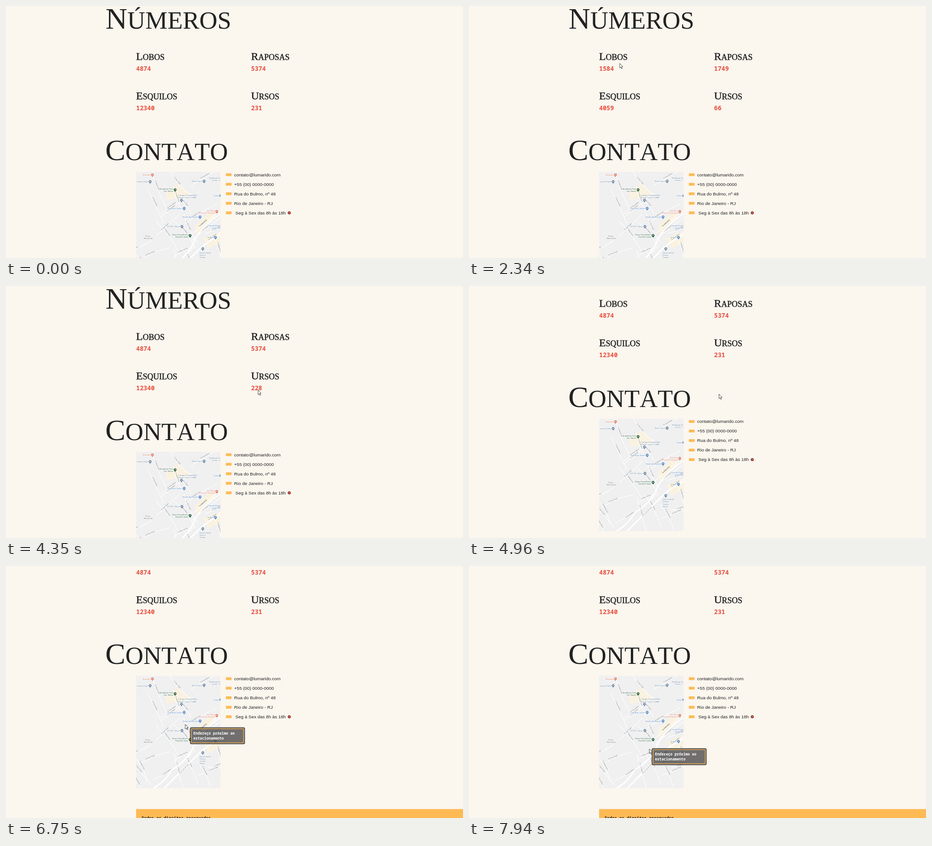
An HTML page for the animation above (8000 ms loop, 1008x556 px).

```html
<!DOCTYPE html>
<html lang="pt-br">
<head>
<meta charset="utf-8">
<title>Números e contato</title>
<style>
  html, body { margin: 0; width: 100%; height: 100%; overflow: hidden; background: #fbf6ee; }
  #stage { display: block; width: 1008px; height: 556px; }
  text { fill: #222; white-space: pre; }
  .title { font: 66.5px "Liberation Serif", serif; font-kerning: none; }
  .title tspan { font-size: 55px; }
  .animal { font: 24px "Liberation Serif", serif; stroke: #222; stroke-width: .5; }
  .animal tspan { font-size: 18px; }
  .count { font: bold 13.65px "Noto Sans Mono", monospace; fill: #e8503f; }
  .contact { font: 9.95px "Liberation Sans", sans-serif; }
  .rights { font: bold 9.1px "Noto Sans Mono", monospace; }
  .hint { font: bold 8px "Noto Sans Mono", monospace; fill: #fff; }
  .place { font: 4.4px Roboto, sans-serif; fill: currentColor; stroke: #fff; stroke-width: .5; paint-order: stroke; }
  .street { font: 3.6px Roboto, sans-serif; fill: #7d8084; }
  .road { fill: none; stroke: #fff; }
</style>
</head>
<body>
<svg id="stage" viewBox="0 0 1008 556">
  <g id="page">
    <g id="content">
      <text class="title" x="219.5" y="50">N<tspan>ÚMEROS</tspan></text>
      <text class="title" x="219" y="340">C<tspan>ONTATO</tspan></text>
      <g id="animals"></g>
      <svg id="map" x="287" y="366" width="186" height="248">
        <rect width="186" height="248" fill="#f0f0f1"/>
        <path fill="#faf2e0" d="M66 46L92 26L122 52L68 62ZM130 118L162 88L176 96L132 140ZM148 146L186 132V156L160 170Z"/>
        <g id="streets"></g>
        <path class="road" stroke-width="3" d="M186 92Q140 124 127 155T78 208Q62 236 38 248M186 138Q150 158 134 176L62 248"/>
        <text class="street" transform="translate(96 216) rotate(-45)">Rua Lume do Vale</text>
        <text class="street" transform="translate(141 121) rotate(-47)">Av. Marulana</text>
        <text class="place" color="#74797f" x="20" y="142.500">Praça<tspan x="17" dy="5.200">Murelinda</tspan></text>
        <g id="places"></g>
      </svg>
      <g id="contacts"></g>
    </g>
    <rect x="287" y="660" width="721" height="80" fill="#ffba54"/>
    <text class="rights" x="299" y="682.500">Todos os direitos reservados</text>
  </g>
  <g id="tooltip">
    <rect width="121.500" height="37.500" rx="3.500" fill="#292727" fill-opacity=".73"/>
    <rect x="3.250" y="3.250" width="115" height="31" rx="1" fill="#fff" fill-opacity=".1" stroke="#e8ae58" stroke-width="1.500"/>
    <text class="hint" x="7.500" y="16.500">Endereço próximo ao</text>
    <text class="hint" x="7.500" y="27">estacionamento</text>
  </g>
  <path id="cursor" d="M.5 .5V10.500L2.800 8.400L4.400 12.200L5.900 11.500L4.300 7.800H7.300Z" fill="#fff" stroke="#222" stroke-width=".8"/>
</svg>
<script>
const LOOP = 8000, RELOAD = 1330, REVEAL = 1500, TICK = 24.8, SCROLL = 123.7;
const get = id => document.getElementById(id);
const add = (id, markup) => get(id).insertAdjacentHTML('beforeend', markup);

const animals = { Lobos: 4874, Raposas: 5374, Esquilos: 12340, Ursos: 231 };
const totals = Object.values(animals);
Object.keys(animals).forEach((name, i) => {
  const x = 287 + 253.5 * (i % 2), y = 119 + 87 * Math.floor(i / 2);
  add('animals', `<text class="animal" x="${x}" y="${y}">${name[0]}<tspan>${name.slice(1).toUpperCase()}</tspan></text>
    <text class="count" x="${x}" y="${y + 23.8}"></text>`);
});
const counters = document.querySelectorAll('.count');

['contato@lumarido.com', '+55 (00) 0000-0000', 'Rua do Bulmo, nº 48', 'Rio de Janeiro - RJ', ' Seg à Sex das 8h às 18h']
  .forEach((line, i) => add('contacts', `<rect x="485" y="${369.3 + 21 * i}" width="12.500" height="6" fill="#ffba54"/>
    <text class="contact" x="503.300" y="${375.6 + 21 * i}">${line}</text>`));
add('contacts', '<circle cx="624.800" cy="456.400" r="2.900" fill="#e8503f" stroke="#3a2522"/>');

// Minor streets: two crossing directions with some jitter
let seed = 11;
const random = (min, max) => {
  seed = seed * 16807 % 2147483647;
  return min + (max - min) * seed / 2147483647;
};
const streetNames = ['R. Alvo Trigal', 'R. Doce Mirto', 'R. Nilda Forte'];
for (let i = 0; i < 30; i++) {
  const angle = (i % 2 ? -32 : 62) + random(-14, 14);
  const length = random(50, 110), bend = random(-10, 10);
  add('streets', `<g transform="translate(${random(0, 186)} ${random(0, 248)}) rotate(${angle})">
    <path class="road" stroke-width="1.100" d="M${-length / 2} 0Q0 ${bend} ${length / 2} 0"/>
    <text class="street" x="${-length / 4}" y="${bend / 2 - 1}">${streetNames[i % 3]}</text></g>`);
}

// A label ends left of its pin, or starts above or below it
function addPlace(colour, x, y, label, side = 'left') {
  const lines = label.split('|');
  const top = { left: 4 - 2.6 * lines.length, above: -10, below: 9.5 }[side];
  const [dx, anchor] = side === 'left' ? [-4, 'end'] : [-7, 'start'];
  add('places', `<g transform="translate(${x} ${y})" color="${colour}">
    <path d="M0 4.300L-2.500 1A3 3 0 1 1 2.500 1Z" fill="currentColor"/><circle cy="-.7" r="1" fill="#fff"/>
    ${lines.map((line, i) => `<text class="place" text-anchor="${anchor}" x="${dx}" y="${top + 5.2 * i}">${line}</text>`).join('')}</g>`);
}
const blue = '#5a8cc4', slate = '#6d8aa6', green = '#2c6342', red = '#e47e62';
addPlace(red, 36, 7, 'Brasalito');
addPlace(slate, 31, 22, 'mança Clube');
addPlace(slate, 192, 16, 'Rodaluga Ven|Centro - Tij');
addPlace(slate, 150, 21, 'Nusp Tijuca');
addPlace(green, 86, 40, 'Academia Trelu|Vix - Bairro');
addPlace(slate, 100, 63, 'Colégio Estadual Nilo|Rande Tavos - LUME', 'above');
addPlace(blue, 187, 53, 'Emba');
addPlace(blue, 106, 81, 'Loja Brilo Jardim');
addPlace(red, 178, 88, 'Ossolena|Clínica &amp; Hospital');
addPlace(blue, 141, 100, 'Nodar Atacadista');
addPlace(blue, 192, 121, 'Tolunda Papela|e Informáti');
addPlace(slate, 101, 121, '07ª DP - Bairro');
addPlace(green, 119, 141, 'Praça Conselheiro|Tomil De Gralo');
addPlace(blue, 175, 145, 'Jardins');
addPlace(slate, 147, 170, 'Universidade|Orlano|Tredes -|Bairro', 'below');

// Stops of the pointer: time, x, y
const stops = [
  [70, 940, 516], [470, 736, 333], [1600, 736, 333], [2550, 275, 97], [3370, 565, 211], [4960, 551, 238],
  [5670, 372, 296], [6050, 455, 375], [6450, 322, 312], [6700, 396, 350], [7350, 328, 292], [8000, 399, 406],
];
const clamp = u => Math.min(1, Math.max(0, u));
const smooth = u => u * u * (3 - 2 * u);

function pointer(t) {
  const next = Math.max(1, stops.findIndex(stop => stop[0] > t));
  const [t0, x0, y0] = stops[next - 1], [t1, x1, y1] = stops[next];
  const u = smooth(clamp((t - t0) / (t1 - t0)));
  return [x0 + (x1 - x0) * u, y0 + (y1 - y0) * u];
}

const place = (id, x, y) => get(id).setAttribute('transform', `translate(${x} ${y})`);
const show = (id, opacity) => get(id).setAttribute('opacity', opacity);

function render(t) {
  const reveal = t < RELOAD ? 1 : 1 - (1 - clamp((t - REVEAL) / 300)) ** 2.25;
  place('content', -20 * (1 - reveal), 0);
  show('content', reveal);

  const scroll = SCROLL * smooth(clamp((t - 4680) / 500));
  place('page', 0, -scroll);

  const ticks = Math.max(0, Math.floor((t - REVEAL) / TICK));
  totals.forEach((total, i) => {
    counters[i].textContent = t < RELOAD ? total : Math.min(total, ticks * Math.floor(total / 100));
  });

  place('cursor', ...pointer(t));
  show('cursor', t < 70 ? 0 : 1);

  // The tooltip trails the pointer while it is over the map
  const [x, y] = pointer(t - 60);
  place('tooltip', x + 10, y + 6);
  show('tooltip', x < 473 && y > 366 - scroll ? 1 : 0);
}

const start = performance.now();
function frame() {
  render((performance.now() - start) % LOOP);
  requestAnimationFrame(frame);
}
render(0);
requestAnimationFrame(frame);
</script>
</body>
</html>
```
